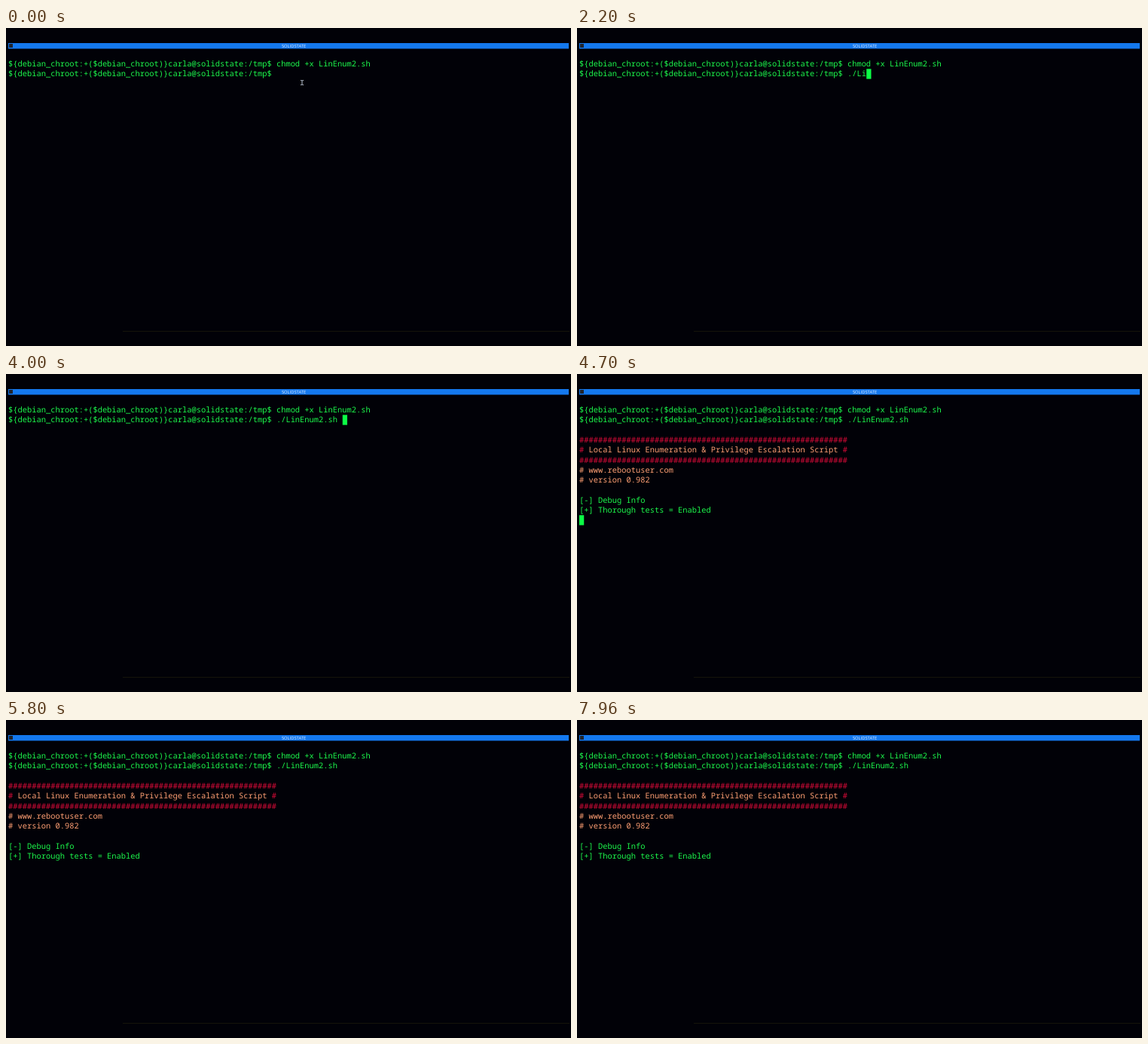
Write an HTML page that moves like this. It is 750 px wide and 422 px high and loops after 8000 ms.

```html
<!DOCTYPE html>
<html lang="en">
<meta charset="utf-8">
<title>Terminal</title>
<style>
html, body { margin: 0; width: 100%; height: 100%; overflow: hidden; background: #010107; }
svg { display: block; width: 750px; height: 422px; }
text {
  font: 500 10.417px "Noto Sans Mono", "DejaVu Sans Mono", monospace;
  font-variant-ligatures: none;
  white-space: pre;
  text-rendering: geometricPrecision;
}
.green { fill: #1cf84c; }
.red { fill: #d80b38; }
.peach { fill: #ff9f73; }
#title { font: 5.8px "Open Sans", sans-serif; fill: #e4efff; text-anchor: middle; }
</style>
<svg viewBox="0 0 750 422">
  <path d="M155 402.5H748" stroke="#15140a"/>
  <rect x="3" y="20" width="744" height="7.5" fill="#1478ee"/>
  <rect x="4" y="21" width="5" height="5" fill="#20242c"/>
  <text id="title" x="382" y="26">SOLIDSTATE</text>
  <g id="lines"></g>
  <g id="output"></g>
  <rect id="cursor" width="6.25" height="13.3" fill="#0cff45"/>
  <path id="mouse" d="M391 69.5h1.2l.8.6.8-.6h1.2M393 70v5M391 75.5h1.2l.8-.6.8.6h1.2" fill="none" stroke="#b4bdcb"/>
</svg>
<script>
const LOOP = 8000, CHAR = 6.25, ROW = 13.3, LEFT = 3;
const PROMPT = "${debian_chroot:+($debian_chroot)}carla@solidstate:/tmp$ ";
const COMMAND = "./LinEnum2.sh ";
const BLINK = 2015, BLINK_START = 3980, RUN = 4110;
// [time, characters typed]; the last step is a tab completion
const KEYS = [[460, 1], [730, 2], [1900, 3], [2100, 4], [2340, 5], [2520, COMMAND.length]];

const $ = id => document.getElementById(id);

// Each part is [colour class, string]
function addLine(parent, row, ...parts) {
  const text = document.createElementNS("http://www.w3.org/2000/svg", "text");
  text.setAttribute("x", LEFT);
  text.setAttribute("y", 51 + row * ROW);
  for (const [colour, string] of parts) {
    const span = document.createElementNS("http://www.w3.org/2000/svg", "tspan");
    span.setAttribute("class", colour);
    span.textContent = string;
    text.append(span);
  }
  parent.append(text);
  return text.firstChild;
}

const lines = $("lines"), output = $("output"), cursor = $("cursor");
addLine(lines, 0, ["green", PROMPT + "chmod +x LinEnum2.sh"]);
const input = addLine(lines, 1, ["green", PROMPT]);

const rule = ["red", "#".repeat(57)];
addLine(output, 3, rule);
addLine(output, 4, ["red", "#"],
  ["peach", " Local Linux Enumeration & Privilege Escalation Script "], ["red", "#"]);
addLine(output, 5, rule);
addLine(output, 6, ["peach", "# www.rebootuser.com"]);
addLine(output, 7, ["peach", "# version 0.982"]);
addLine(output, 9, ["green", "[-] Debug Info"]);
addLine(output, 10, ["green", "[+] Thorough tests = Enabled"]);

const show = (node, on) => node.setAttribute("visibility", on ? "visible" : "hidden");

function draw(t) {
  const typed = KEYS.reduce((n, [time, count]) => t >= time ? count : n, 0);
  const running = t >= RUN;
  const column = running ? 0 : PROMPT.length + typed;
  const phase = (t - BLINK_START + 2 * BLINK) % BLINK;

  input.textContent = PROMPT + COMMAND.slice(0, typed);
  cursor.setAttribute("x", LEFT + column * CHAR);
  cursor.setAttribute("y", 41 + (running ? 11 : 1) * ROW);
  show(cursor, t >= 200 && phase < BLINK / 2);
  show($("mouse"), t < 200);
  show(output, running);
}

function tick() {
  draw(performance.now() % LOOP);
  requestAnimationFrame(tick);
}
tick();
</script>
</html>
```
